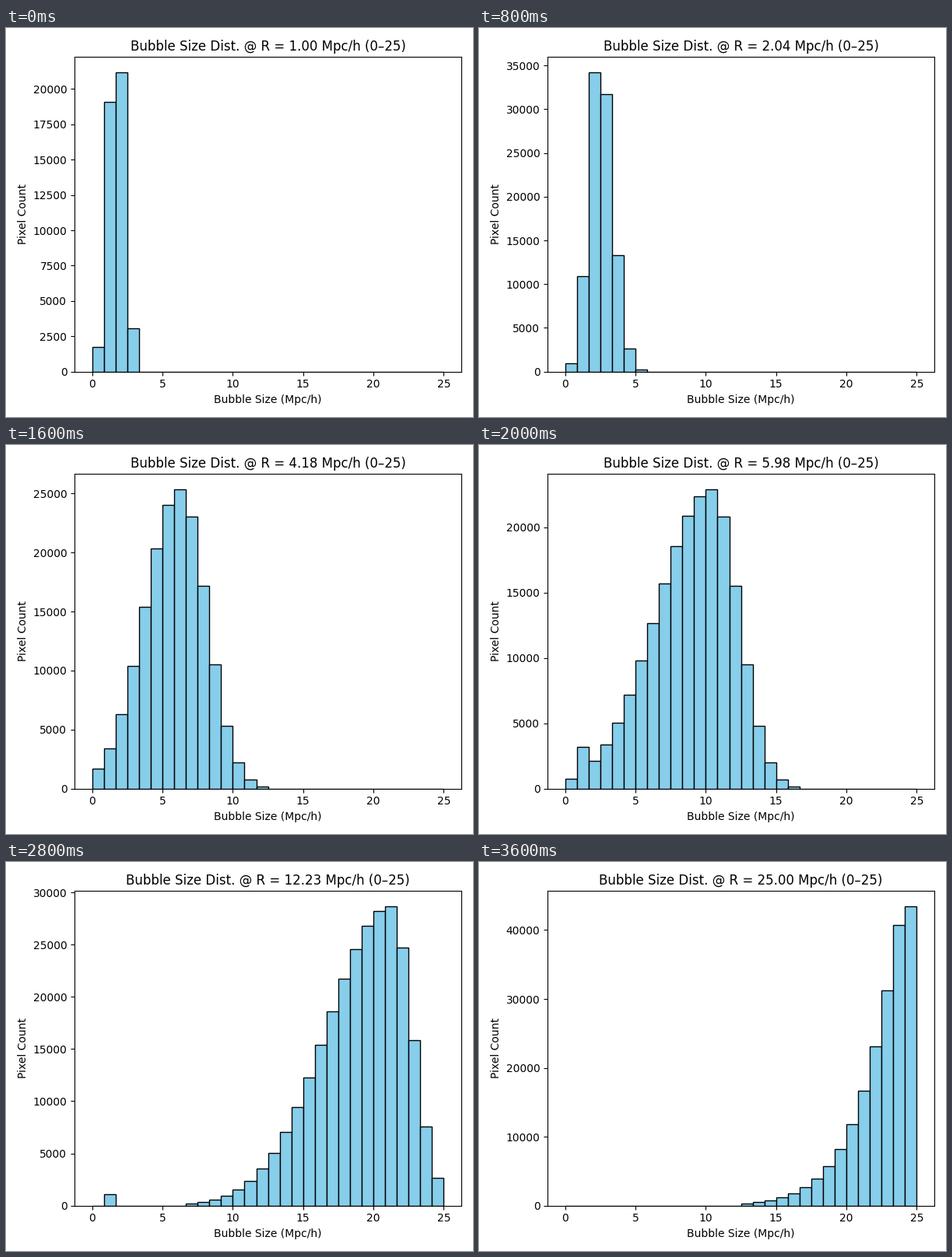
These frames come from a looping animation (600x500 px, 4000 ms). A matplotlib script:

```python
import numpy as np
import matplotlib.pyplot as plt
from matplotlib.animation import FuncAnimation

R_MAX = 25
STEPS = 10
BINS = 30
CUTOFF = 0.005  # bins below this share of the peak stay empty

EDGES = np.linspace(0, R_MAX, BINS + 1)
CENTERS = (EDGES[:-1] + EDGES[1:]) / 2
RADII = np.geomspace(1, R_MAX, STEPS)

# Key points of the distribution as {step: value}; positions and widths in bins.
MODE = {0: 1.53, 2: 2.35, 4: 7, 5: 12, 6: 20.2, 7: 25, 9: 28.7}
LEFT = {0: 0.93, 2: 1.22, 4: 4.24, 5: 6.5, 6: 8.5, 7: 7.6, 9: 3.6}
RIGHT = {0: 1.0, 2: 1.63, 4: 3.2, 6: 3.2, 7: 2.6}
POWER = {7: 2, 9: 1.2}
PEAK = {0: 21200, 2: 34240, 4: 25370, 5: 22910, 6: 22390, 7: 28690, 9: 43490}
SMALL = {4: 0, 5: 1900, 6: 2600, 7: 1100, 9: 0}


def at(keys, step):
    return np.interp(step, list(keys), list(keys.values()))


def histogram(step):
    """Two-sided bell around the mode, plus a group of one-cell bubbles."""
    d = np.arange(BINS) - at(MODE, step)
    width = np.where(d < 0, at(LEFT, step), at(RIGHT, step))
    bell = np.exp(-np.abs(d / width) ** at(POWER, step))
    bell /= bell.max()
    bell[bell < CUTOFF] = 0
    counts = bell * at(PEAK, step)
    counts[1] += at(SMALL, step)
    return counts


def draw(step):
    ax.clear()
    ax.hist(CENTERS, bins=EDGES, weights=histogram(step),
            color="skyblue", edgecolor="black")
    ax.set_title(f"Bubble Size Dist. @ R = {RADII[step]:.2f} Mpc/h (0–{R_MAX})")
    ax.set_xlabel("Bubble Size (Mpc/h)")
    ax.set_ylabel("Pixel Count")


plt.rcParams["font.family"] = "DejaVu Sans"
fig, ax = plt.subplots(figsize=(6, 5), dpi=100)
draw(0)
fig.tight_layout()

anim = FuncAnimation(fig, draw, frames=STEPS, interval=400, repeat=True)
plt.show()
```
